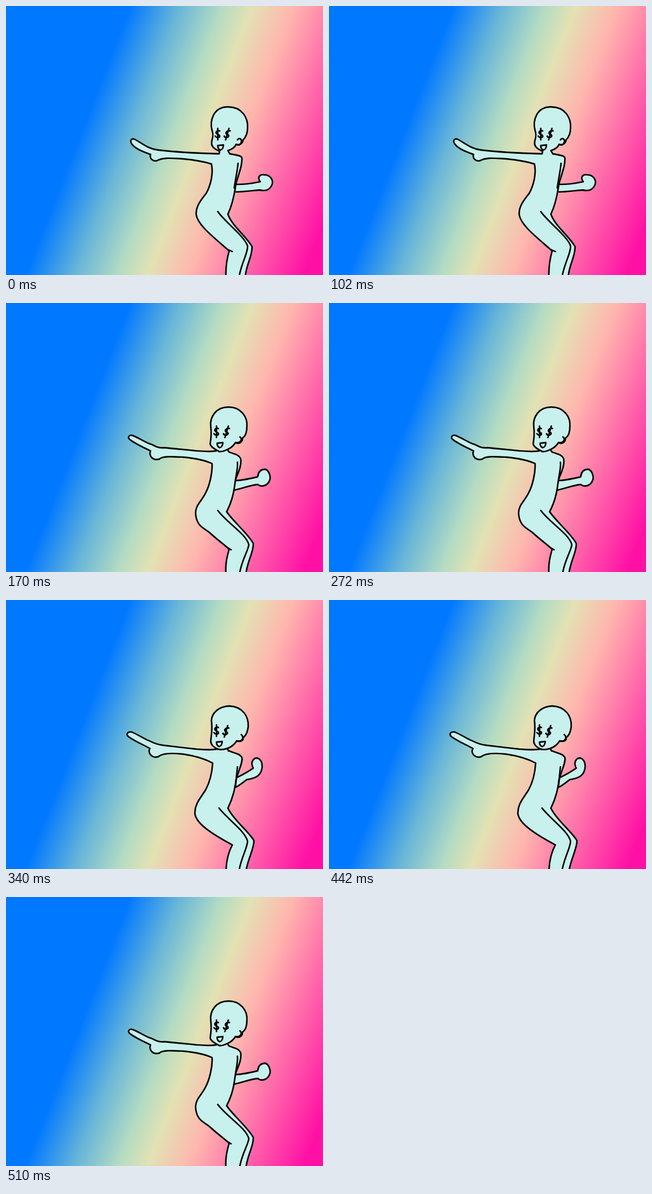
These frames come from a looping animation (500x424 px, 680 ms). An HTML page:

```html
<!DOCTYPE html>
<html lang="en">
<head>
<meta charset="utf-8">
<title>Dance</title>
<style>
html, body { margin: 0; width: 100%; height: 100%; overflow: hidden; }
svg { display: block; width: 100%; height: 100%; }
#figure { fill: #c8f0ec; stroke: #000; stroke-width: 2.4; stroke-linecap: round; stroke-linejoin: round; }
#figure .line { fill: none; }
</style>
</head>
<body>
<svg viewBox="0 0 500 424" preserveAspectRatio="none">
  <defs>
    <linearGradient id="sky" gradientUnits="userSpaceOnUse" x1="195" y1="0" x2="577" y2="149">
      <stop offset="0" stop-color="#0078ff"/>
      <stop offset=".18" stop-color="#68b6d8"/>
      <stop offset=".335" stop-color="#b4dcc2"/>
      <stop offset=".44" stop-color="#e2e2b4"/>
      <stop offset=".59" stop-color="#ffb6ae"/>
      <stop offset="1" stop-color="#ff10a5"/>
    </linearGradient>
    <path id="dollar" d="M3 -5C0 -7 -4 -4 -2 -1C0 1 4 1 3 4C1 7 -3 5 -4 3M0 -9L0 9"/>
  </defs>
  <rect width="500" height="424" fill="url(#sky)"/>
  <g id="figure">
    <path id="backArm"/>
    <path id="body"/>
    <path id="folds" class="line"/>
    <path id="head"/>
    <path id="ear" class="line"/>
    <g id="eyeL" class="line"><use href="#dollar"/></g>
    <g id="eyeR" class="line"><use href="#dollar" transform="skewX(-16)"/></g>
    <path id="mouth" class="line" d="M0 0L9 -1C9 3 7 7 4 7C1 6 0 3 0 0Z"/>
  </g>
</svg>
<script>
const HOLD = 170;
const ORDER = [0, 1, 2, 1];
const poses = [
  {
    backArm: 'M362 281C378 282 390 279 401 277C396 270 400 265 407 266C417 266 423 275 419 283C415 291 408 292 400 290C388 291 375 293 363 293',
    body: 'M336 233C300 232 265 230 240 227C226 226 215 217 203 210C198 208 195 212 198 217C204 225 214 229 228 234C226 240 231 245 238 244C248 238 262 240 280 241C300 243 312 245 324 249C327 262 324 280 316 295C308 305 299 316 300 329C303 346 327 364 352 386C348 400 346 412 347 430L377 430C378 408 389 395 388 379C378 362 356 346 350 328C359 310 361 290 363 279C368 262 373 250 372 239C370 235 362 235 353 233',
    folds: 'M334 324C345 340 376 363 381 378C382 390 371 404 367 430M350 384L357 387M366 248C365 260 362 272 360 287',
    head: 'M336 233L337 229C328 225 322 221 325 211C327 205 327 202 325 196C321 181 327 159 350 159C373 159 382 177 381 192C381 200 379 206 374 211C373 218 366 220 363 218C361 223 356 226 350 228L353 233',
    ear: 'M365 211C368 207 373 210 371 215C370 219 366 220 363 218',
    eyeL: [334, 202], eyeR: [349, 202], mouth: [334, 220]
  },
  {
    backArm: 'M362 280C375 279 385 277 397 274C398 264 404 262 409 262C415 264 418 274 416 279C413 288 403 291 397 286C385 287 375 292 360 295',
    body: 'M332 233C322 235 312 234 300 233C284 231 266 230 250 228C240 229 236 226 230 223C221 221 211 213 200 209C195 207 191 211 195 215C204 222 215 227 228 233C225 241 231 249 242 246C247 241 262 242 280 243C300 245 314 248 325 253C326 267 321 288 315 299C309 312 299 318 299 331C300 351 311 354 320 361C332 372 343 380 352 388C347 405 346 415 347 430L378 430C380 407 391 393 390 379C383 365 358 344 348 329C358 310 360 294 362 278C368 264 372 254 370 245C366 238 360 238 352 235',
    folds: 'M334 327C349 347 379 364 383 381C382 391 370 408 368 430M350 386L355 389M365 251C366 260 363 270 362 279',
    head: 'M336 234C330 230 323 228 322 222C324 211 324 203 323 195C321 180 331 164 351 164C371 164 381 180 380 194C380 203 378 210 373 213C373 220 367 223 362 220C358 226 354 229 349 231L352 235',
    ear: 'M369 211C373 214 371 221 362 220M336 234C341 235 345 233 349 231',
    eyeL: [332, 203], eyeR: [348, 203], mouth: [333, 221]
  },
  {
    backArm: 'M366 279C374 275 383 270 390 265C385 256 390 249 396 249C404 251 406 262 402 271C398 280 388 282 380 283C374 287 368 293 362 295',
    body: 'M333 235C322 237 312 236 300 235C283 233 264 231 248 229C238 228 232 225 226 222C218 219 208 212 198 208C192 207 188 212 194 216C204 223 214 227 227 234C223 241 230 250 240 247C247 241 262 241 280 243C300 246 315 251 326 257C325 272 321 288 315 299C307 312 297 322 298 337C300 353 327 370 357 386C350 399 347 414 347 430L378 430C381 408 392 391 391 379C382 364 358 346 350 328C359 310 361 296 363 283C368 265 374 255 372 248C368 241 360 242 350 237',
    folds: 'M336 328C350 346 377 364 381 380C381 391 370 407 367 430M365 263C364 275 363 280 362 294',
    head: 'M334 235C328 232 323 229 323 222C324 210 326 204 324 190C325 177 336 168 352 167C374 168 383 184 382 200C381 209 378 214 374 217C375 222 369 224 364 222C360 228 355 232 349 234L351 238',
    ear: 'M371 212C376 217 373 224 364 222M334 235C340 237 345 235 349 234',
    eyeL: [332, 206], eyeR: [347, 207], mouth: [332, 224]
  }
];

const find = id => document.getElementById(id);
let shown = -1;

function show(n) {
  if (n === shown) return;
  shown = n;
  for (const [id, v] of Object.entries(poses[n])) {
    if (Array.isArray(v)) find(id).setAttribute('transform', `translate(${v})`);
    else find(id).setAttribute('d', v);
  }
}

function tick() {
  show(ORDER[Math.floor(performance.now() / HOLD) % ORDER.length]);
  requestAnimationFrame(tick);
}
tick();
</script>
</body>
</html>
```
